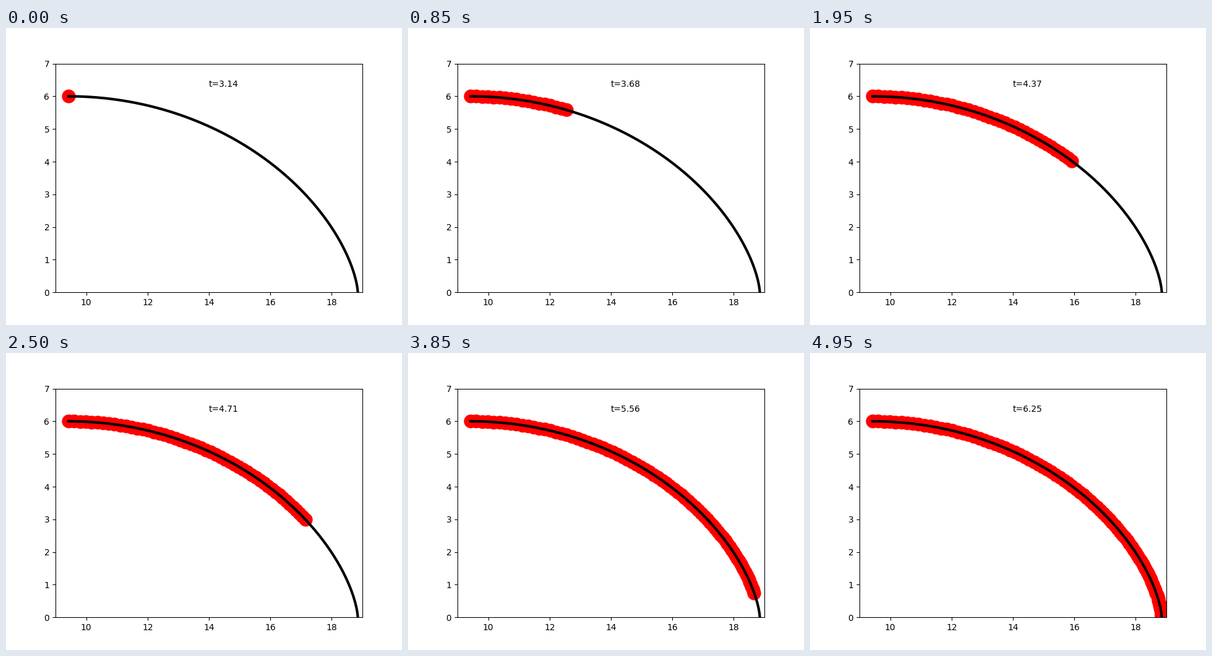
A matplotlib script for the animation above (5 s loop, 640 by 480 pixels).

```python
import numpy as np
import matplotlib.pyplot as plt
from matplotlib.animation import FuncAnimation

RADIUS = 3
FRAMES = 100
STEP = np.pi / FRAMES


def cycloid(t):
    return RADIUS * (t - np.sin(t)), RADIUS * (1 - np.cos(t))


plt.rcParams["font.family"] = "DejaVu Sans"
fig, ax = plt.subplots(figsize=(6.4, 4.8), dpi=100)
ax.set_xlim(9, 19)
ax.set_ylim(0, 7)

balls, = ax.plot([], [], "o", color="red", markersize=15)
ax.plot(*cycloid(np.linspace(np.pi, 2 * np.pi, FRAMES)), color="black", linewidth=3)
label = ax.text(14, 6.3, "")


def update(frame):
    # Every ball so far stays visible as a trail
    t = np.pi + STEP * np.arange(frame + 1)
    balls.set_data(*cycloid(t))
    label.set_text(f"t={t[-1]:.2f}")
    return balls, label


anim = FuncAnimation(fig, update, frames=FRAMES, interval=50, repeat=True)
plt.show()
```
